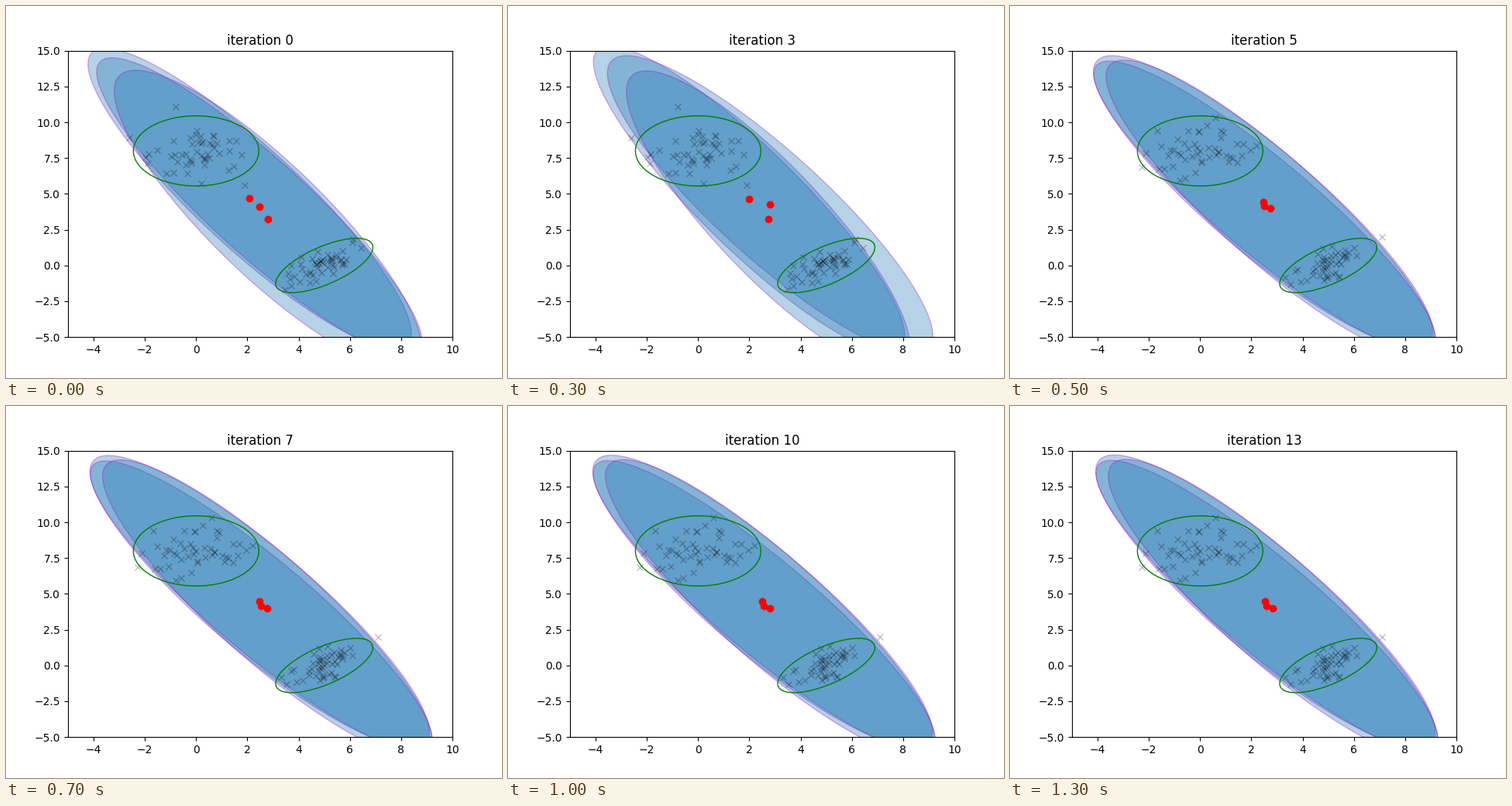
Write a matplotlib script that moves like this. It is 640 px wide and 480 px high and loops after 1400 ms.

```python
import numpy as np
import matplotlib.pyplot as plt
from matplotlib.animation import FuncAnimation
from matplotlib.patches import Polygon

FRAMES, INTERVAL = 14, 100
RESTART = 5                # iteration at which a fresh sample is fitted
CHI = np.sqrt(5.991)       # 95 % contour of a 2-D Gaussian
TURN = np.linspace(0, 2 * np.pi, 240, endpoint=False)

# True clusters: mean x, mean y, variance (same on both axes), correlation
CLUSTERS = ((0, 8, 1, 0), (5, 0, .6, 2 / 3))

# Fitted components: centre x, centre y, half width, half height, correlation
FIRST = np.array([(2.09, 4.67, 6.31, 10.50, -.895),
                  (2.47, 4.10, 6.35, 10.40, -.905),
                  (2.80, 3.21, 6.00, 10.42, -.86)])
FIRST_DRIFT = np.array([(-.15, -.03, -.35, .27, 0),
                        (.51, .22, 0, 0, .035),
                        (-.09, 0, -.69, -.06, 0)])
SECOND = np.array([(2.455, 4.45, 6.62, 10.20, -.89),
                   (2.515, 4.13, 6.67, 10.14, -.91),
                   (2.757, 3.98, 6.43, 10.36, -.89)])
SECOND_DRIFT = np.array([.09, .03, 0, .02, 0])


def contour(cx, cy, half_w, half_h, rho):
    """Outline of a correlated ellipse given by its half extents."""
    return np.column_stack([cx + half_w * np.cos(TURN),
                            cy + half_h * np.cos(TURN - np.arccos(rho))])


def sample(seed, count=50, tightness=.85):
    """Draw points from both true clusters."""
    rng = np.random.default_rng(seed)
    return np.vstack([
        rng.multivariate_normal((x, y), tightness * var * np.array([[1, rho], [rho, 1]]),
                                count)
        for x, y, var, rho in CLUSTERS])


def components(iteration):
    if iteration < RESTART:
        return FIRST + FIRST_DRIFT * (iteration / (RESTART - 1)) ** 1.4
    return SECOND + SECOND_DRIFT * (iteration - RESTART) / (FRAMES - 1 - RESTART)


samples = sample(3), sample(8)

fig, ax = plt.subplots(figsize=(6.4, 4.8), dpi=100)
ax.set_xlim(-5, 10)
ax.set_ylim(-5, 15)
title = ax.set_title("", pad=5.3)

blobs = [ax.add_patch(Polygon(contour(0, 0, 1, 1, 0), fc="tab:blue",
                              ec="#aa00c8", lw=1, alpha=.33))
         for _ in FIRST]
crosses, = ax.plot([], [], "kx", alpha=.25)
for x, y, var, rho in CLUSTERS:
    radius = CHI * np.sqrt(var)
    ax.add_patch(Polygon(contour(x, y, radius, radius, rho),
                         fill=False, ec="g", lw=1, zorder=2.5))
means, = ax.plot([], [], "ro", zorder=3)


def update(iteration):
    title.set_text(f"iteration {iteration}")
    crosses.set_data(*samples[iteration >= RESTART].T)
    state = components(iteration)
    for blob, params in zip(blobs, state):
        blob.set_xy(contour(*params))
    means.set_data(state[:, 0], state[:, 1])
    return [title, crosses, means, *blobs]


anim = FuncAnimation(fig, update, frames=FRAMES, interval=INTERVAL,
                     init_func=lambda: update(0), repeat=True, repeat_delay=0)
plt.show()
```
